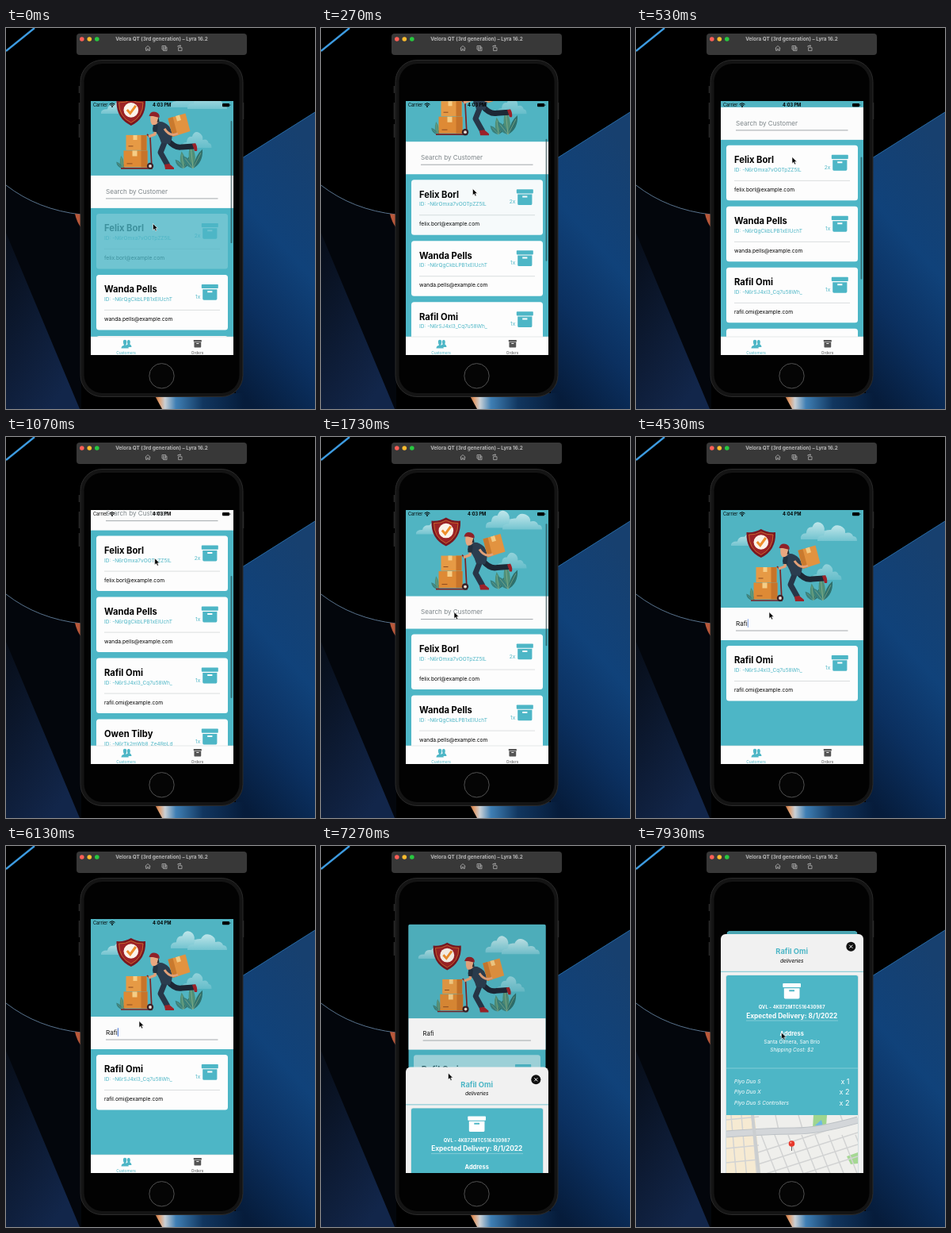
Write an HTML page that moves like this. It is 390x480 px and loops after 8000 ms.

```html
<!DOCTYPE html>
<html lang="en">
<head>
<meta charset="utf-8">
<title>Delivery app</title>
<style>
html, body { margin: 0; width: 390px; height: 480px; overflow: hidden; background: #000; }
svg { display: block; }
text { font-family: Inter, Roboto, sans-serif; font-size: 6.5px; white-space: pre; }
.b { font-weight: 700; }
.i { font-style: italic; }
.m { text-anchor: middle; }
.e { text-anchor: end; }
.teal { fill: #4db6c6; }
.white { fill: #fff; }
</style>
</head>
<body>
<svg width="390" height="480" viewBox="0 0 390 480">
<defs>
  <linearGradient id="blue" x1=".55" y1="0" x2=".25" y2="1">
    <stop offset="0" stop-color="#17406f"/><stop offset=".4" stop-color="#10427a"/>
    <stop offset=".7" stop-color="#0b3060"/><stop offset="1" stop-color="#061c3b"/>
  </linearGradient>
  <linearGradient id="slate" x1="0" y1="0" x2=".6" y2="1">
    <stop offset="0" stop-color="#070d18"/><stop offset="1" stop-color="#12264a"/>
  </linearGradient>
  <linearGradient id="glow">
    <stop offset="0" stop-color="#8a4322"/><stop offset=".06" stop-color="#e09a68"/>
    <stop offset=".13" stop-color="#c9d0d6"/><stop offset=".25" stop-color="#3f7fb4"/>
    <stop offset=".55" stop-color="#11365f"/><stop offset="1" stop-color="#061c3b"/>
  </linearGradient>
  <linearGradient id="mist" x1="0" y1="0" x2="0" y2="1">
    <stop offset="0" stop-color="#bfe6ea"/><stop offset="1" stop-color="#74c4d0"/>
  </linearGradient>
  <clipPath id="screen"><rect x="107" y="92" width="180" height="320"/></clipPath>
  <clipPath id="page"><rect id="pageBox" x="107" y="92" width="180" height="320"/></clipPath>
  <clipPath id="mapBox"><rect x="114" y="339" width="166" height="80"/></clipPath>
  <g id="box">
    <rect width="21" height="5.2" rx=".8"/>
    <path d="M1.4 6.3H19.6V18.2a1.6 1.6 0 0 1-1.6 1.6H3a1.6 1.6 0 0 1-1.6-1.6ZM7.4 8.4V10.4H13.6V8.4Z" fill-rule="evenodd"/>
  </g>
  <path id="cloud" d="M0 20q-1-7 8-7q1-8 9-7q4-8 12-5q7 3 6 9q8-2 10 4q5 0 5 6Z"/>
  <g id="leaf">
    <path d="M0 0Q-9-10-3-27Q7-13 0 0" fill="#4f8f78"/>
    <path d="M0 0Q3-15 12-21Q13-6 0 0" fill="#2f706c"/>
    <path d="M0 0Q-12-2-13-14Q-2-11 0 0" fill="#39807c"/>
    <path d="M0 0L-2.500-22M0 0L10-17M0 0L-10-11" stroke="#a5bf92" stroke-width=".5"/>
  </g>
</defs>

<!-- desktop -->
<rect width="390" height="480"/>
<path d="M0 198Q40 229 95 235V480H0Z" fill="#03060c"/>
<path d="M0 258L93 480H0Z" fill="url(#slate)"/>
<path d="M0 198Q40 229 95 235" fill="none" stroke="#58728c"/>
<path d="M87 234l8 1v17q-6-8-8-18z" fill="#b9583a"/>
<path d="M0 29L36 0" stroke="#3d9be0" stroke-width="2.400"/>
<path d="M290 169L390 106V480H290Z" fill="url(#blue)"/>
<path d="M290 169L390 106" stroke="#2f7bbd" stroke-width=".8"/>
<path d="M186 460H300V480H197Z" fill="url(#glow)"/>

<!-- window bar -->
<rect x="89" y="7" width="215" height="27" rx="4" fill="#383838"/>
<circle cx="95.8" cy="14" r="2.8" fill="#fe5f57"/>
<circle cx="105.3" cy="14" r="2.8" fill="#febc2e"/>
<circle cx="114.8" cy="14" r="2.8" fill="#28c840"/>
<text class="b m" x="196.5" y="16.2" fill="#b9b9b9" style="font-size:6.4px">Velora QT (3rd generation) – Lyra 16.2</text>
<g fill="none" stroke="#b0b0b0" stroke-width=".8">
  <path d="M175.7 25.5L179 22.5L182.3 25.5M176.6 25V28.4H178.2V26.4H179.8V28.4H181.4V25"/>
  <path d="M197 22.5H201.5V27H197ZM198.6 27V28.6H203V24.2H201.5"/><circle cx="199.3" cy="24.8" r="1"/>
  <path d="M217.6 24.7H222V28.6H217.6ZM217 24V22.5H220.5M219.4 21.2L220.8 22.5L219.4 23.8"/>
</g>

<!-- phone -->
<path d="M92.5 73v9M92.5 94v21M92.5 121v17M299.5 94v21" stroke="#2a2a2a" stroke-width="1.6"/>
<rect x="94" y="40.5" width="205" height="424" rx="27" fill="#141414" stroke="#2b2b2b"/>
<rect x="98.5" y="45" width="196" height="415" rx="23" fill="#020202"/>
<circle cx="196.5" cy="438.3" r="15.7" fill="#050505" stroke="#515151"/>

<g clip-path="url(#screen)">
  <g id="app"><g clip-path="url(#page)">
    <rect x="107" y="92" width="180" height="320" class="teal"/>
    <g id="scroll">
      <g id="hero">
        <rect x="107" y="92" width="180" height="123" fill="#50b4c2"/>
        <g fill="url(#mist)">
          <use href="#cloud" transform="translate(208 107) scale(.85 1.1)"/>
          <use href="#cloud" transform="translate(229 111)"/>
          <use href="#cloud" transform="translate(120 121) scale(1 .8)"/>
          <use href="#cloud" transform="translate(222 160) scale(.75 1)" opacity=".6"/>
        </g>
        <use href="#leaf" transform="translate(147 206) scale(.6)"/>
        <use href="#leaf" transform="translate(224 206) scale(.8)"/>
        <use href="#leaf" transform="translate(236 206) scale(1 1.15)"/>
        <path d="M157.800 116Q166 121 176 120Q177 143 157.800 152Q138.500 143 139.500 120Q149.500 121 157.800 116" fill="#7a1720"/>
        <path d="M157.800 119.500Q165 123.500 173 123Q173 141 157.800 148.500Q142.500 141 142.500 123Q150.500 123.500 157.800 119.500" fill="#9c2326" stroke="#d9772f" stroke-width=".8"/>
        <circle cx="157.800" cy="132.500" r="9.300" fill="#fbf3ea"/>
        <path d="M152.800 132l4 4.500l7-9.500" fill="none" stroke="#ef8f2c" stroke-width="3"/>
        <path d="M145 206H184L182 167L178 163" fill="none" stroke="#7b2224" stroke-width="1.700"/>
        <g transform="translate(-2.500 0)">
          <rect x="154" y="164" width="26" height="19" fill="#e69a45"/>
          <rect x="151" y="183.500" width="30" height="21" fill="#de8a35"/>
          <path d="M173 164h7v19h-7zM173 183.500h8v21h-8z" fill="#c7742a"/>
          <path d="M163 164h5v6h-5zM162 183.500h6v7h-6z" fill="#f6cd85"/>
          <path d="M157 178h6M155 200h7" stroke="#8a4a20"/>
        </g>
        <circle cx="182" cy="203" r="4.200" fill="#3a2228"/><circle cx="182" cy="203" r="1.900" fill="#e9dfd3"/>
        <path d="M204 170Q213 181 222 179L237 178" fill="none" stroke="#1d2836" stroke-width="7" stroke-linejoin="round"/>
        <path d="M201 171L195 186L204 202" fill="none" stroke="#273648" stroke-width="7" stroke-linejoin="round"/>
        <path d="M235 175l4-1q3 5 2 10h-3zM200 201l6-1l6 5v2h-11z" fill="#9c2229"/>
        <path d="M186 150Q196 143 206 153Q213 163 207 175L196 174Q192 160 185 157Z" fill="#2b3d4f"/>
        <path d="M189 153L188 163L180 166" fill="none" stroke="#e2a077" stroke-width="3.400" stroke-linejoin="round"/>
        <path d="M189 151L188 160" stroke="#23313f" stroke-width="5.500"/>
        <path d="M182.500 139h9l1 8q-3 5-8 4q-3-3-2-12" fill="#e8a880"/>
        <path d="M180.500 140q2-7 9-5q5 2 4 7l-8-2z" fill="#8f2128"/>
        <path d="M192.500 141l1 6l-3 1z" fill="#222a33"/>
        <path d="M204.500 143l22-6.500l6 22.500l-22 7z" fill="#e29340"/>
        <path d="M204.500 143l6-1.800l6 23l-6 1.800z" fill="#c97a2e"/>
        <path d="M214 140.200l5-1.500l2 6.500l-5 1.500z" fill="#f4cb84"/>
        <path d="M200 156Q207 167 217 162" fill="none" stroke="#e2a077" stroke-width="3"/>
      </g>
      <rect x="107" y="215" width="180" height="41" fill="#fcfcfc"/>
      <text id="query" x="126" y="237.700" style="font-size:8.100px"></text>
      <path d="M126 244H267.500" stroke="#8d9499" stroke-width=".8"/>
      <rect id="caret" y="229.300" width="1.100" height="10.600" fill="#3c6fd8"/>
      <g id="cards"></g>
    </g>
    <rect id="bar" x="283.600" y="101.600" width="1.800" height="154" rx=".9" fill="#1f3d42"/>
    <rect x="107" y="389" width="180" height="24" fill="#fdfdfd"/>
    <path d="M107 389H287" stroke="#d6dadb" stroke-width=".6"/>
    <g class="teal">
      <path d="M152.500 402q0-2.500 3-3.300q-1.500-5.700 1.300-5.700q3 0 1.500 5.600q2.200.8 2.200 3.400z" transform="translate(-2 0)"/>
      <path d="M145.500 403.500q0-3 3.500-3.800q-2.800-6.700 1-6.900q4 .2 1.200 6.900q3.600.8 3.600 3.800z"/>
      <text class="m" x="151.500" y="411" style="font-size:4.800px">Customers</text>
    </g>
    <g fill="#545454">
      <use href="#box" transform="translate(236.800 393) scale(.48)"/>
      <text class="m" x="241.500" y="411" style="font-size:4.800px">Orders</text>
    </g>
    <g id="status">
      <text x="110" y="99" style="font-size:5.600px">Carrier</text>
      <path d="M130.500 96.200q3.500-3 7 0M131.800 97.600q2.200-1.800 4.400 0" fill="none" stroke="#000" stroke-width="1"/>
      <circle cx="134" cy="99" r=".9"/>
      <text id="clock" class="b m" x="196.700" y="99" style="font-size:5.600px"></text>
      <rect x="273" y="95" width="9" height="4.200" rx="1"/><rect x="282.500" y="96.300" width=".8" height="1.600"/>
    </g>
    <rect id="dim" x="107" y="92" width="180" height="320"/>
  </g></g>

  <g id="sheet">
    <path d="M107 420V117a6 6 0 0 1 6-6H281a6 6 0 0 1 6 6V420Z" fill="#f1f1f1"/>
    <text class="teal b m" x="196.700" y="136.200" style="font-size:9.300px">Rafil Omi</text>
    <text class="i m" x="196.700" y="146.700">deliveries</text>
    <circle cx="271.300" cy="126.700" r="6" fill="#111"/>
    <path d="M269.300 124.700l4 4m0-4l-4 4" stroke="#fff" stroke-width="1"/>
    <path d="M107 158.300H287" stroke="#6cc2cf" stroke-width=".9"/>
    <rect x="113" y="162.500" width="168" height="258" rx="3" fill="#d3dfe1"/>
    <rect x="114" y="163" width="166" height="258" rx="2.500" class="teal"/>
    <g class="white">
      <use href="#box" transform="translate(185.300 173) scale(1.080 .98)"/>
      <text class="b m" x="196.700" y="205" style="font-size:5.700px;letter-spacing:.15px">QVL - 4KB72MTC516430987</text>
      <text class="b m" x="196.700" y="216.500" style="font-size:8.300px">Expected Delivery: 8/1/2022</text>
      <path d="M139 220H255M114 280H280" stroke="#a5dbe3" stroke-width=".6"/>
      <text class="b m" x="196.700" y="239.200" style="font-size:7.400px">Address</text>
      <text class="m" x="196.700" y="249">Santa Olmera, San Brio</text>
      <text class="i m" x="196.700" y="258.700">Shipping Cost: $2</text>
      <g id="items"></g>
    </g>
    <g clip-path="url(#mapBox)" fill="none">
      <rect x="114" y="339" width="166" height="80" fill="#efefec"/>
      <path d="M114 339H150L158 420H114Z" fill="#f6ead2"/>
      <path d="M224 339h17l-1 14l-17 3z" fill="#9fd58e"/>
      <path d="M226 352l8-7l2 8z" fill="#6fb9e6"/>
      <path d="M266 391l14-5v14l-9 1z" fill="#a5d893"/>
      <path id="streets" stroke="#d2d3d3" stroke-width="1.500"/>
      <path d="M114 363Q170 359 200 359T280 345" stroke="#bcc1c5" stroke-width="9"/>
      <path d="M114 363Q170 359 200 359T280 345" stroke="#d3d6d9" stroke-width="7"/>
      <path d="M147 339L156 420" stroke="#cbced0" stroke-width="4"/>
      <path d="M196.500 378v6" stroke="#666" stroke-width="1"/>
      <circle cx="196.500" cy="375" r="3.800" fill="#e8392c"/><circle cx="195.400" cy="373.800" r="1" fill="#ffa297"/>
    </g>
  </g>
</g>
<path id="pointer" d="M0 0V8.300L1.900 6.600L3.200 9.500L4.700 8.800L3.400 6H6Z" stroke="#fff" stroke-width=".6"/>
</svg>

<script>
const LOOP = 8000;
const $ = id => document.getElementById(id);
const set = (el, attrs) => { for (const k in attrs) el.setAttribute(k, attrs[k]); };
const ramp = (t, a, b) => Math.min(1, Math.max(0, (t - a) / (b - a)));

// Smooth, non-overshooting curve through [time, value] points.
function curve(pts) {
  const rate = pts.slice(1).map((p, i) => (p[1] - pts[i][1]) / (p[0] - pts[i][0]));
  const slope = pts.map((_, i) => {
    const a = rate[i - 1], b = rate[i];
    return a * b > 0 ? 2 * a * b / (a + b) : 0;
  });
  return t => {
    if (t <= pts[0][0]) return pts[0][1];
    const i = pts.findIndex(p => p[0] > t) - 1;
    if (i < 0) return pts[pts.length - 1][1];
    const [t0, v0] = pts[i], [t1, v1] = pts[i + 1];
    const d = t1 - t0, u = (t - t0) / d, w = 1 - u;
    return v0 * (1 + 2 * u) * w * w + v1 * u * u * (3 - 2 * u)
      + d * u * w * (slope[i] * w - slope[i + 1] * u);
  };
}

const scrollY = curve([[-330, 0], [0, 29], [530, 115], [750, 140], [950, 150], [1150, 125], [1450, 52], [1730, 14.5], [2000, 3], [2330, 0]]);
const pointerX = curve([[0, 185.5], [530, 197], [800, 196], [1600, 168], [6130, 168], [6670, 160.5], [7330, 160.5], [7870, 183.5]]);
const pointerY = curve([[-330, 275], [0, 246.5], [530, 162.5], [750, 147], [950, 146], [1600, 220.5], [6130, 220.5], [6670, 286], [7330, 286], [7870, 235]]);
const firstFade = curve([[70, .2], [300, 1]]);
const pressFade = curve([[6870, 1], [7000, .2], [7150, .2], [7450, 1]]);
const rise = curve([[7130, 0], [7200, .17], [7270, .44], [7400, .8], [7530, .95], [7680, 1]]);
const typing = [[2870, "R"], [3070, "Ra"], [3330, "Raf"], [3670, "Rafi"]];

const customers = [
  ["Felix Borl", "-N6rOmxa7vOOTpZZ5IL", 2],
  ["Wanda Pells", "-N6rQgCkbLPB1xEIUchT", 1],
  ["Rafil Omi", "-N6rSJ4xl3_Cq7u58Wh_", 1],
  ["Owen Tilby", "-N6rTk2mWb8_Ze4RpLd", 1]
];
$("cards").innerHTML = customers.map(([name, id, count]) => `<g>
  <rect x="114" y="263" width="166" height="69.500" rx="3.500" fill="#fdfdfd"/>
  <text class="b" x="124" y="285.400" style="font-size:11.200px">${name}</text>
  <text class="teal" x="124" y="296">ID: ${id}</text>
  <path d="M124 307.500H270" stroke="#d4d7d8" stroke-width=".8"/>
  <text x="124" y="321" style="font-size:6.700px">${name.toLowerCase().replace(" ", ".")}@example.com</text>
  <text class="teal e" x="245.300" y="293">${count}x</text>
  <use href="#box" class="teal" x="246.800" y="275"/></g>`).join("");
const cards = [...$("cards").children];

$("items").innerHTML = [["Plyo Duo S", 1], ["Plyo Duo X", 2], ["Plyo Duo S Controllers", 2]]
  .map(([name, n], i) => `<text class="i" x="124" y="${299 + i * 13.4}">${name}</text>
    <text class="e" x="269.500" y="${300 + i * 13.4}" style="font-size:9px">x ${n}</text>`).join("");

let streets = "";
for (let i = 0; i < 8; i++) {
  streets += `M${158 + i * 17} 364L${180 + i * 17} 420`;
  if (i < 4) streets += `M154 ${386 + i * 15}L280 ${346 + i * 15}M114 ${345 + i * 18}L155 ${341 + i * 18}`;
  if (i < 3) streets += `M${120 + i * 13} 339L${127 + i * 13} 420`;
}
set($("streets"), { d: streets + "M176 339L180 358M205 339L210 356M258 339L262 350" });

function draw(t) {
  const y = scrollY(t), p = rise(t);
  const typed = typing.filter(k => k[0] <= t).map(k => k[1]).pop() || "";

  set($("scroll"), { transform: `translate(0 ${-y})` });
  set($("bar"), { y: 101.6 + y * .53, opacity: .6 * (1 - ramp(t, 2330, 2600)) });
  $("clock").textContent = t < 2800 ? "4:03 PM" : "4:04 PM";

  $("query").textContent = typed || "Search by Customer";
  set($("query"), { fill: typed ? "#111" : "#7d8589" });
  const m = t % 1000;
  const blink = t < 4100 ? 1 : 1 - ramp(m, 110, 270) + ramp(m, 440, 600);
  const width = typed ? $("query").getComputedTextLength() : 0;
  set($("caret"), { x: 126.2 + width, opacity: t >= 2470 && t < 6930 ? blink : 0 });

  cards.forEach((card, i) => {
    const hit = i === 2;
    set(card, {
      transform: `translate(0 ${typed ? 0 : i * 77})`,
      display: typed && !hit ? "none" : "inline",
      opacity: i === 0 ? firstFade(t) : hit ? pressFade(t) : 1
    });
  });

  const s = 1 - p * .083;
  set($("app"), { transform: `translate(${197 * (1 - s)} ${92 + 15 * p - 92 * s}) scale(${s})` });
  set($("pageBox"), { rx: 5 * p });
  set($("dim"), { opacity: .09 * p });
  set($("status"), { opacity: p > 0 ? 0 : 1 });
  set($("sheet"), { transform: `translate(0 ${301 * (1 - p)})` });
  set($("pointer"), { transform: `translate(${pointerX(t)} ${pointerY(t)})` });
}

function tick() {
  draw(performance.now() % LOOP);
  requestAnimationFrame(tick);
}
tick();
</script>
</body>
</html>
```
